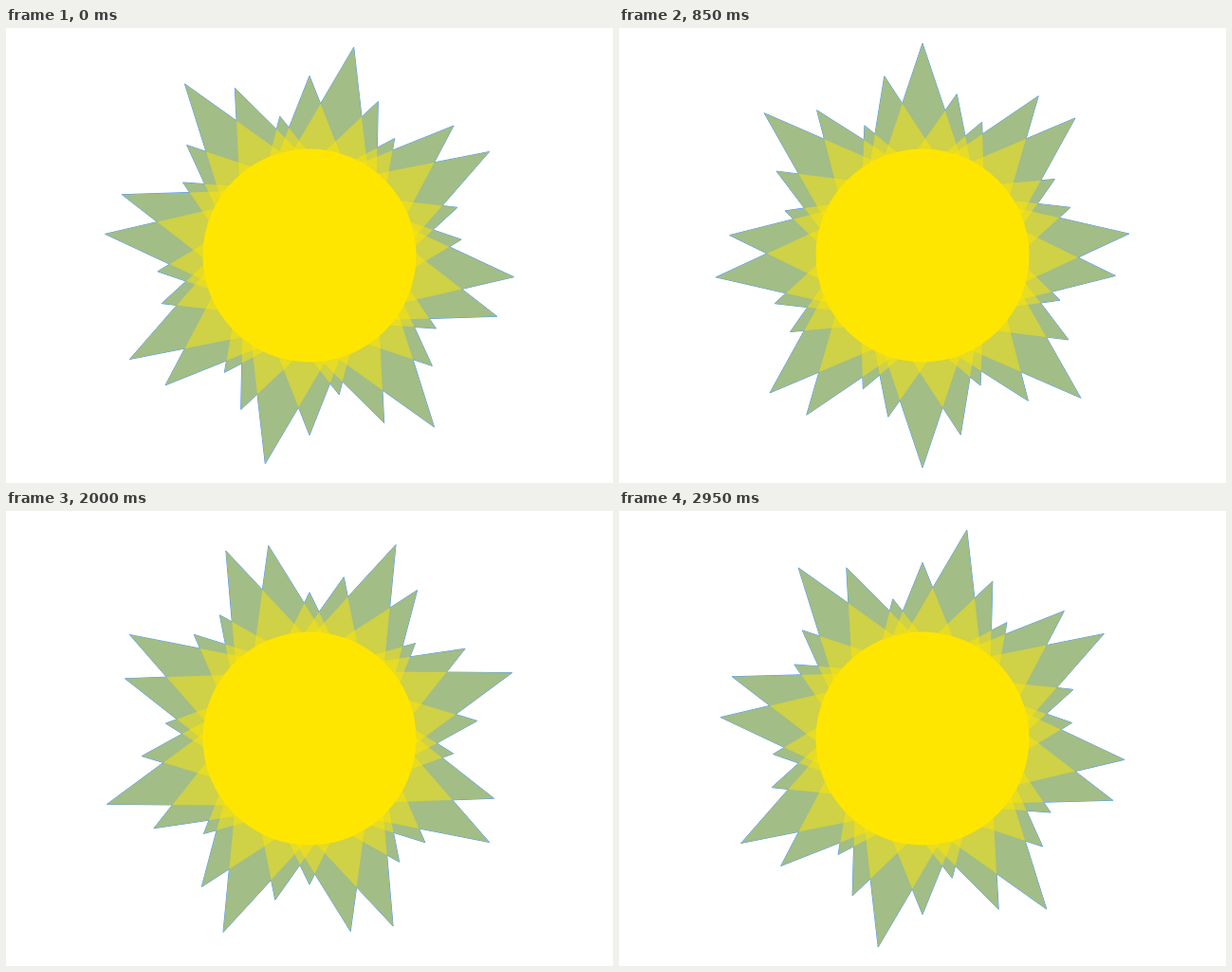
These frames come from a looping animation (640x480 px, 3 s). An HTML page with a canvas:

```html
<!DOCTYPE html>
<html>
<head>
<meta charset="utf-8">
<title>Pulsing sun</title>
<style>
html, body { margin: 0; width: 100%; height: 100%; overflow: hidden; background: #fff; }
canvas { display: block; }
</style>
</head>
<body>
<canvas id="stage" width="640" height="480"></canvas>
<script>
const ctx = document.getElementById('stage').getContext('2d');
const LOOP = 3000, STEP = 50;
const SPIKES = 15, HALF_WIDTH = 75, DISC = 112.5;
const SKY = 'rgb(76,151,255)', SUN = '#ffe600';
const rad = deg => deg * Math.PI / 180;

// Each spike is a diamond through the centre, with both tips showing past the disc.
function spike(i, time) {
  const reach = 187.5 + 37.5 * Math.cos(rad(96 * i - 87 + 360 * time / LOOP));
  const a = rad(12 * i), s = Math.sin(a), c = Math.cos(a);
  const path = new Path2D();
  for (const [x, y] of [[0, -reach], [HALF_WIDTH, 0], [0, reach], [-HALF_WIDTH, 0]])
    path.lineTo(320 + x * c - y * s, 240 + x * s + y * c);
  path.closePath();
  return path;
}

function draw(time) {
  const spikes = Array.from({ length: SPIKES }, (_, i) => spike(i, time));
  ctx.clearRect(0, 0, 640, 480);

  // Blue backing leaves a thin rim around the translucent spikes.
  ctx.fillStyle = ctx.strokeStyle = SKY;
  ctx.lineJoin = 'bevel';
  ctx.lineWidth = 1;
  for (const p of spikes) {
    ctx.fill(p);
    ctx.stroke(p);
  }

  ctx.fillStyle = SUN;
  ctx.globalAlpha = 0.48;
  for (const p of spikes) ctx.fill(p);
  ctx.globalAlpha = 1;

  ctx.beginPath();
  ctx.arc(320, 240, DISC, 0, 2 * Math.PI);
  ctx.fill();
}

function tick() {
  const time = performance.now() % LOOP;
  draw(Math.floor(time / STEP) * STEP);
  requestAnimationFrame(tick);
}
tick();
</script>
</body>
</html>
```
